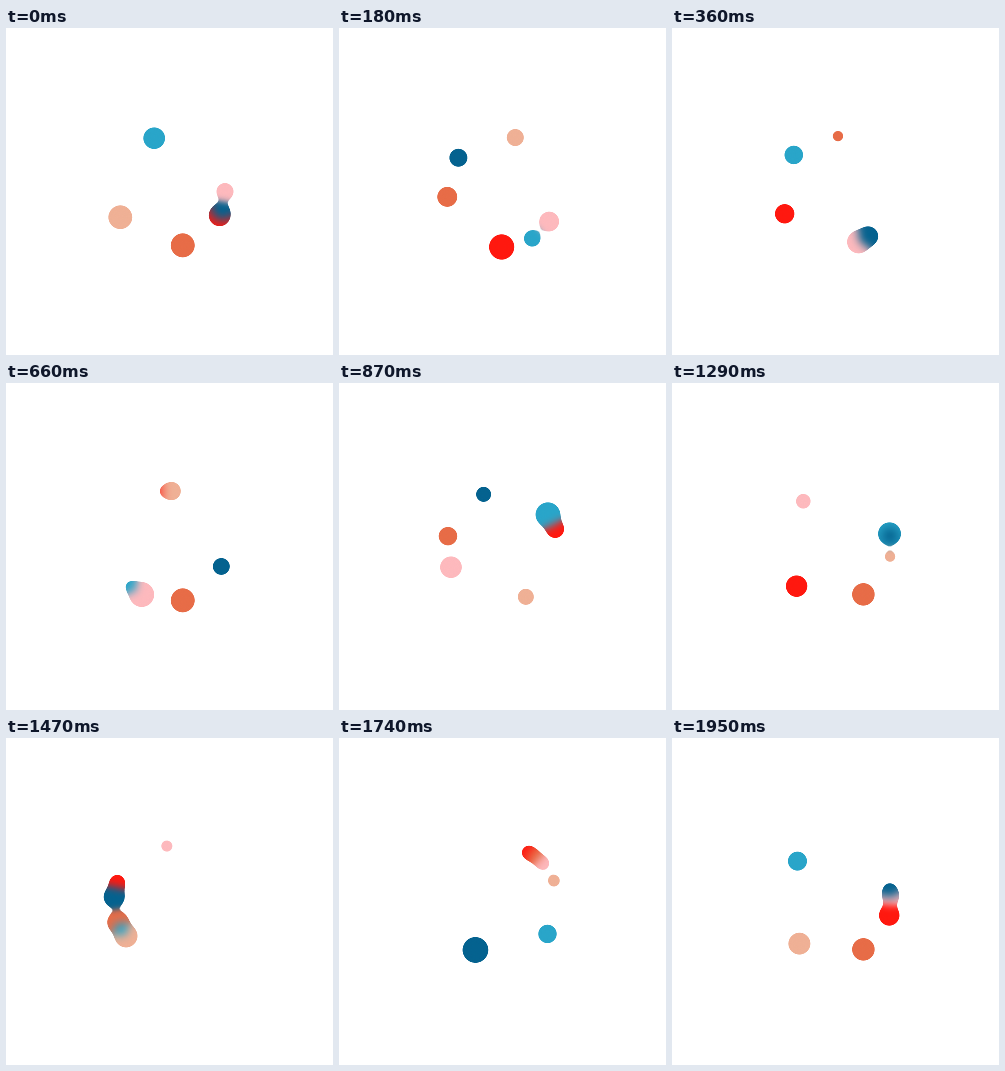
Animation, 327 px wide and 327 px high, one loop 1980 ms. Source, as an HTML page:

```html
<!DOCTYPE html>
<html lang="en">
<head>
<meta charset="utf-8">
<title>Gooey orbit</title>
<style>
  html, body { margin: 0; width: 100%; height: 100%; overflow: hidden; background: #fff; }
  svg { display: block; width: 100vw; height: 100vh; }
</style>
</head>
<body>
<svg viewBox="0 0 327 327">
  <filter id="goo" filterUnits="userSpaceOnUse" x="0" y="0" width="327" height="327"
          color-interpolation-filters="sRGB">
    <feGaussianBlur stdDeviation="4"/>
    <feColorMatrix values="1 0 0 0 0  0 1 0 0 0  0 0 1 0 0  0 0 0 18 -7"/>
  </filter>
  <g id="balls" filter="url(#goo)"></g>
</svg>
<script>
const LOOP = 1980, STEP = 30;
const CENTER = 163.5, ORBIT = 55.5;
const R_MAX = 12.9, R_MIN = 5.7;
// Bottom to top; the nth ball makes n turns and n pulses per loop.
const COLORS = ['#fdb9bd', '#ff180f', '#e76c47', '#efb095', '#29a5c9', '#04628f'];

const group = document.getElementById('balls');
const balls = COLORS.map((color, i) => {
  const n = i + 1;
  const el = document.createElementNS('http://www.w3.org/2000/svg', 'circle');
  el.setAttribute('fill', color);
  group.append(el);
  return {
    el, n,
    start: 90 + 25.4 * n * (n - 1) / 2,           // degrees clockwise from the top
    peak: 0.077 + 0.0355 * (n - 3) * (n - 4)      // pulse phase of the largest size
  };
});

// 0 at whole phases, 1 halfway, linear between.
const triangle = phase => {
  const p = phase - Math.floor(phase);
  return 1 - Math.abs(1 - 2 * p);
};

function draw(time) {
  const turn = Math.floor((time % LOOP) / STEP) * STEP / LOOP;
  for (const { el, n, start, peak } of balls) {
    const a = (start + 360 * n * turn) * Math.PI / 180;
    el.setAttribute('cx', CENTER + ORBIT * Math.sin(a));
    el.setAttribute('cy', CENTER - ORBIT * Math.cos(a));
    el.setAttribute('r', R_MAX - (R_MAX - R_MIN) * triangle(n * turn - peak));
  }
}

const begin = performance.now();
function tick() {
  draw(performance.now() - begin);
  requestAnimationFrame(tick);
}
tick();
</script>
</body>
</html>
```
